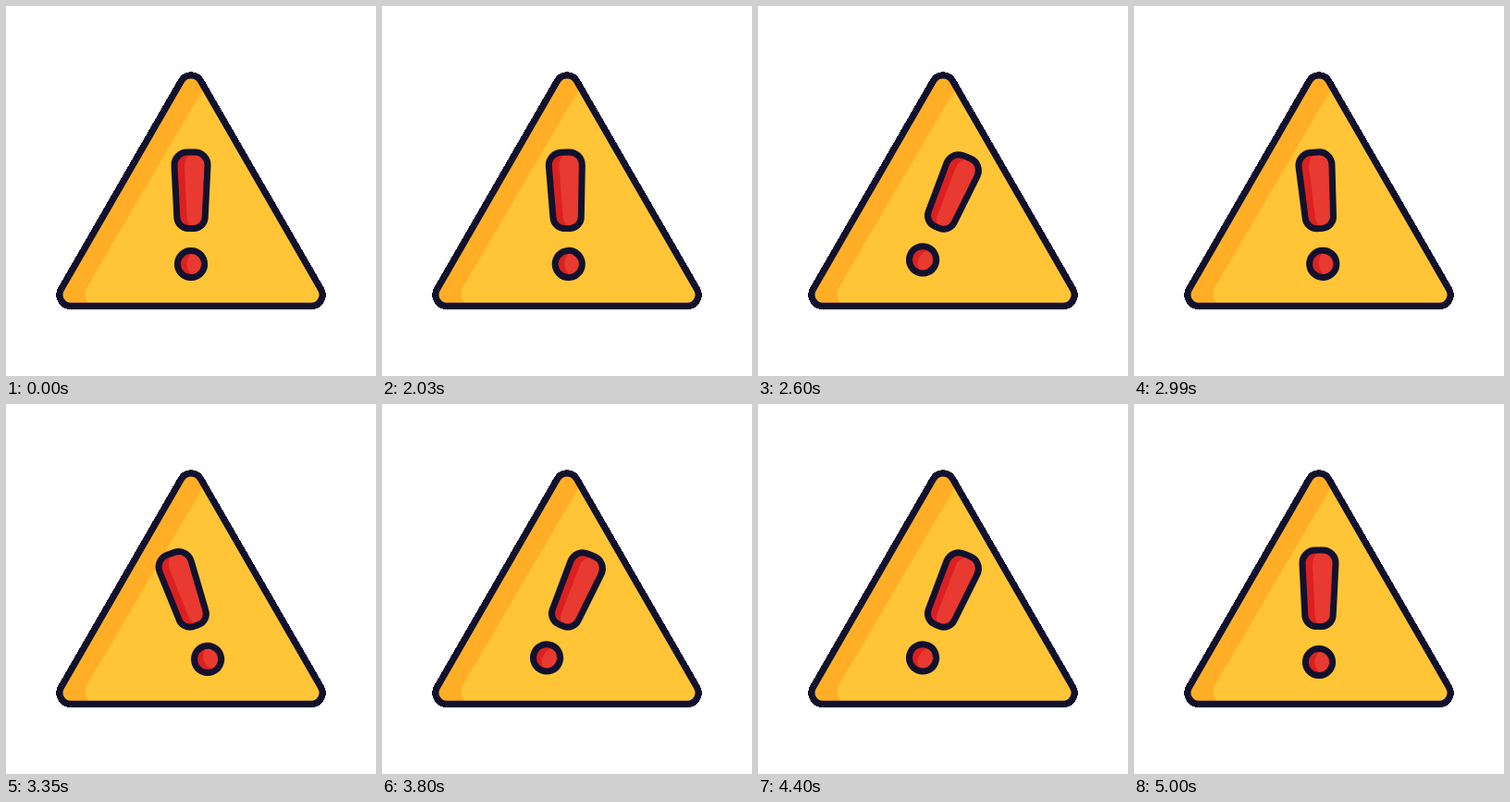
These frames come from a looping animation (400 by 400 pixels, 5030 ms). An HTML page without scripts:

```html
<!DOCTYPE html>
<html lang="en">
<head>
<meta charset="utf-8">
<title>Warning sign</title>
<style>
  @property --step { syntax: "<number>"; inherits: false; initial-value: 0; }

  html, body { margin: 0; width: 100%; height: 100%; overflow: hidden; background: #fff; }
  svg { display: block; width: 100vw; height: 100vh; }
  .line { fill: none; stroke: #12112d; stroke-width: 7; stroke-linejoin: round; }
  .rim { stroke-width: 7.4; shape-rendering: crispEdges; }

  /* A swing takes ten steps; the first starts upright, the last ones fade out */
  .mark {
    --left: -19.2deg;
    --right: calc(23.5deg * clamp(0, var(--step) - 4, 1));
    --mix: calc((1 + cos(var(--step) * 36deg)) / 2);
    --fade: pow(clamp(0, (100 - var(--step)) / 20, 1), 1.5);
    transform: rotate(calc(var(--fade) * (var(--left) * (1 - var(--mix)) + var(--right) * var(--mix))));
    transform-origin: 200px 224px;
    animation: shake 5.03s steps(100) -4ms infinite;
  }
  @keyframes shake {
    0%, 39.761% { --step: 0; }
    99.404%, 100% { --step: 100; }
  }
</style>
</head>
<body>
<svg viewBox="0 0 400 400">
  <defs>
    <path id="sign" d="M189.6 81A12 12 0 0 1 210.4 81L340.4 306.3A12 12 0 0 1 330 324.3H70A12 12 0 0 1 59.6 306.3Z"/>
    <path id="bar" d="M196 158H204A14 14 0 0 1 218 172.5L215.2 228A12.5 12.5 0 0 1 203 240.5H197A12.5 12.5 0 0 1 184.8 228L182 172.5A14 14 0 0 1 196 158Z"/>
    <circle id="dot" cx="200" cy="279" r="14.6"/>
  </defs>

  <use href="#sign" class="line rim"/>
  <use href="#sign" fill="#ffae25"/>
  <path fill="#ffc536" d="M213 90L88 303Q82 314 91 323H330A12 12 0 0 0 340.4 306.3Z"/>
  <use href="#sign" class="line"/>

  <g class="mark">
    <g fill="#dc2020">
      <use href="#bar"/>
      <use href="#dot"/>
    </g>
    <g fill="#e83a30">
      <path d="M204 158Q193 162 193 174L195.5 228Q196 237 203 240.5A12.5 12.5 0 0 0 215.2 228L218 172.5A14 14 0 0 0 204 158Z"/>
      <path d="M204 265Q195.5 270 195.5 279T204 293A14.6 14.6 0 0 0 204 265Z"/>
    </g>
    <use href="#bar" class="line"/>
    <use href="#dot" class="line"/>
  </g>
</svg>
</body>
</html>
```
